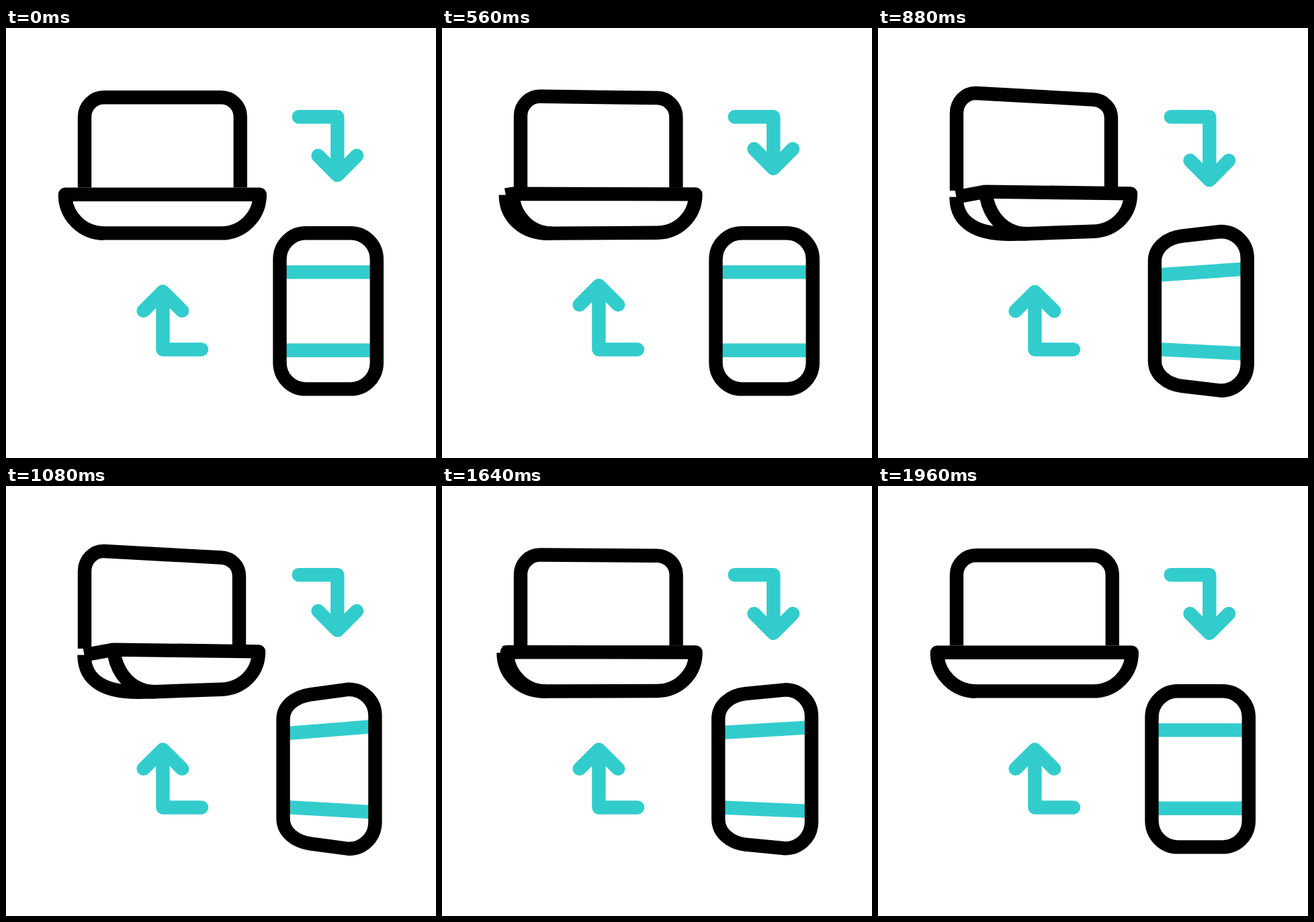
An HTML page that plays this animation: 640x640 px, repeating every 2.12 s.

```html
<!DOCTYPE html>
<html lang="en">
<head>
<meta charset="utf-8">
<title>Device sync</title>
<style>
  html, body { margin: 0; width: 100%; height: 100%; overflow: hidden; background: #fff; }
  svg { display: block; width: 100%; height: 100%; }
  path { fill: none; stroke: #000; stroke-width: 20.4; stroke-linejoin: round; }
  .teal { stroke: #33cccc; }
  .arrow { stroke-linecap: round; }
</style>
</head>
<body>
<svg viewBox="0 0 640 640">
  <path id="lid"/>
  <path id="side"/>
  <path id="base"/>
  <path id="bands" class="teal"/>
  <path id="phone"/>
  <path id="down" class="teal arrow"/>
  <path id="up" class="teal arrow"/>
</svg>
<script>
const LOOP = 2120, TURN = 540;

// Each shape: flat path, turned path with the same commands.
const laptop = {
  lid: [
    'M117 237.4 L117 132 C117 116 130 103.3 146 103.3 L320 103.3 C336 103.3 348.8 116 348.8 132 L348.8 237.4',
    'M117 242 L117 127 C117 110 130 96.5 146 97 L320 106.5 C336 107.5 347 119 347 134 L347 238'
  ],
  side: [
    'M88 247.7 C88 280 114 305.4 146 305.4 L146 305.4 M88 247.7 L88 247.7',
    'M116.5 251.5 C116.5 290 147 307 197 306.8 L222 306.2 M116.5 251.5 L160 243.6'
  ],
  base: [
    'M88 247.7 C88 280 114 305.4 146 305.4 L320 305.4 C352 305.4 377.8 280 377.8 247.7 Z',
    'M160 243.6 C164 280 188 306.2 222 306.2 L320 302.7 C352 301.5 376 278 376 246.4 Z'
  ]
};
const mobile = {
  bands: [
    'M408 363.4 L552 363.4 M408 479.7 L552 479.7',
    'M412 368.6 L550 357.7 M412 477.7 L550 485.6'
  ],
  phone: [
    'M407.5 344 C407.5 322.7 424.8 305.2 446 305.2 L513 305.2 C534.5 305.2 551.8 322.7 551.8 344 L551.8 498.5 C551.8 520 534.5 537.4 513 537.4 L446 537.4 C424.8 537.4 407.5 520 407.5 498.5 Z',
    'M412.5 347 C412.5 328 430 313.5 453 310.3 L510 302.7 C532 302.7 549.4 320 549.4 342 L549.4 500.5 C549.4 522.5 532 540 510 540 L453 532.3 C430 529 412.5 514.5 412.5 495.5 Z'
  ]
};

// Arrow push: time since start, shift along its direction.
const PUSH = [[0, 0], [220, -10], [490, 9], [690, -6.5], [825, 0]];

const $ = id => document.getElementById(id);
const clamp = t => Math.min(1, Math.max(0, t));
const ease = t => t < 0.5 ? 4 * t ** 3 : 1 - 4 * (1 - t) ** 3;
const draw = (id, d) => $(id).setAttribute('d', d);

function mix(a, b, p) {
  const ends = b.match(/[\d.]+/g);
  let i = 0;
  return a.replace(/[\d.]+/g, n => +n + (ends[i++] - n) * p);
}

function turn(shapes, p) {
  for (const id in shapes) draw(id, mix(...shapes[id], p));
}

// Turn away at `start`, return 920 ms later.
const swing = (t, start) =>
  ease(clamp((t - start) / TURN)) - ease(clamp((t - start - 920) / TURN));

function push(t) {
  const i = PUSH.findIndex(k => k[0] > t);
  if (i < 1) return 0;
  const [t0, a] = PUSH[i - 1], [t1, b] = PUSH[i];
  return a + (b - a) * ease((t - t0) / (t1 - t0));
}

function frame(now) {
  const t = now % LOOP;
  turn(laptop, swing(t, 350));
  turn(mobile, swing(t, 508));
  const low = 219 + push(t - 330), high = 392.2 - push(t - 90);
  draw('down', `M435.7 132.2 H493.3 V${low} M464.5 ${low - 29} L493.3 ${low} L522.1 ${low - 29}`);
  draw('up', `M291 478.5 H233.4 V${high} M204.6 ${high + 28.7} L233.4 ${high} L262.2 ${high + 28.7}`);
}

const start = performance.now();
function tick() {
  frame(performance.now() - start);
  requestAnimationFrame(tick);
}
tick();
</script>
</body>
</html>
```
